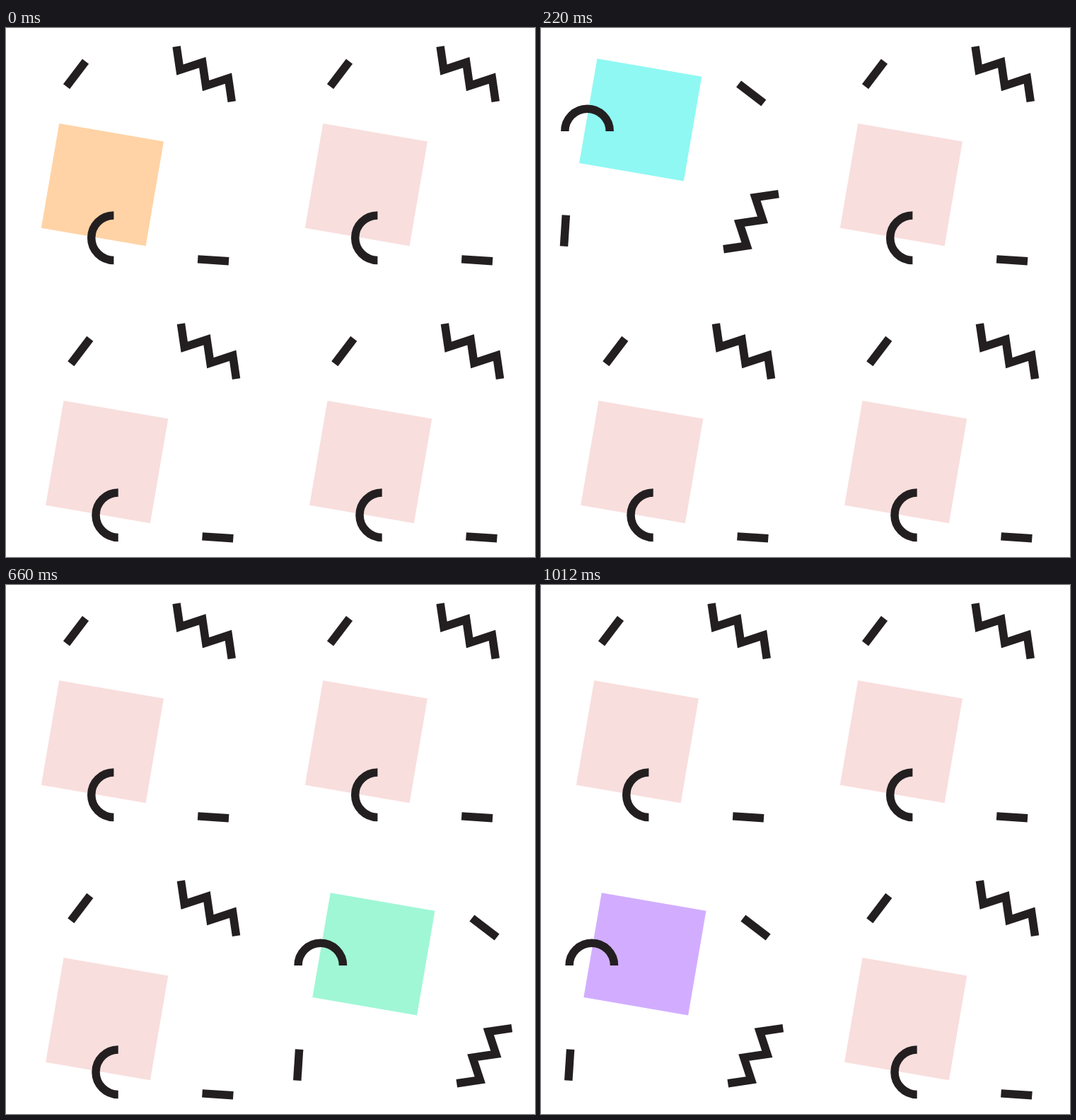
An HTML page with a canvas for the animation above (1.1 s loop, 748 by 748 pixels).

```html
<!DOCTYPE html>
<html lang="en">
<head>
<meta charset="utf-8">
<title>Pattern tiles</title>
<style>
  html, body { margin: 0; width: 100%; height: 100%; overflow: hidden; background: #fff; }
  canvas { display: block; width: 748px; height: 748px; }
</style>
</head>
<body>
<canvas id="stage"></canvas>
<script>
const SIZE = 748, STEP = 220, DEG = Math.PI / 180;
const INK = '#231f20', PINK = '#f8dedd';
const ACCENTS = ['#ffd3a5', '#8ff8f3', '#f7ff80', '#a0f7d5', '#d2adff'];
const PIVOT_X = 184.35, PIVOT_Y = 177.85;

const canvas = document.getElementById('stage');
const ctx = canvas.getContext('2d');
const ratio = window.devicePixelRatio || 1;
canvas.width = canvas.height = Math.round(SIZE * ratio);

// Filled rectangle placed by its centre.
function box(x, y, w, h, angle, color) {
  ctx.save();
  ctx.translate(x, y);
  ctx.rotate(angle * DEG);
  ctx.fillStyle = color;
  ctx.fillRect(-w / 2, -h / 2, w, h);
  ctx.restore();
}

function zigzag(x, y) {
  ctx.beginPath();
  ctx.moveTo(x, y);
  for (let i = 0; i < 5; i++) {
    const down = i % 2 === 0;
    x += down ? 4.85 : 31.8;
    y += down ? 33 : -10.5;
    ctx.lineTo(x, y);
  }
  ctx.stroke();
}

function drawTile(col, row, color, turned) {
  ctx.save();
  ctx.translate(col * 373 + row * 6.3 + PIVOT_X, row * 392 + PIVOT_Y);
  if (turned) ctx.rotate(90 * DEG);
  ctx.translate(-PIVOT_X, -PIVOT_Y);

  box(136.4, 221.6, 149.9, 149.9, 9.75, color);
  box(99, 65, 44.4, 11.5, -52.6, INK);
  box(293.1, 328.3, 43.9, 11.5, 3.7, INK);

  ctx.strokeStyle = INK;
  ctx.lineWidth = 11.5;
  zigzag(241.1, 26.2);
  ctx.beginPath();
  ctx.arc(152.4, 296.7, 31.7, 90 * DEG, 270 * DEG);
  ctx.stroke();
  ctx.restore();
}

function draw(time) {
  const step = Math.floor(time / STEP) % ACCENTS.length;
  // The accent starts top left, then travels clockwise round the grid.
  const spot = Math.max(step - 1, 0);
  const spotCol = spot % 3 ? 1 : 0;
  const spotRow = spot > 1 ? 1 : 0;

  ctx.setTransform(ratio, 0, 0, ratio, 0, 0);
  ctx.fillStyle = '#fff';
  ctx.fillRect(0, 0, SIZE, SIZE);
  for (let row = 0; row < 2; row++) {
    for (let col = 0; col < 2; col++) {
      const active = col === spotCol && row === spotRow;
      drawTile(col, row, active ? ACCENTS[step] : PINK, active && step > 0);
    }
  }
}

const start = performance.now();
function loop() {
  draw(performance.now() - start);
  requestAnimationFrame(loop);
}
loop();
</script>
</body>
</html>
```
